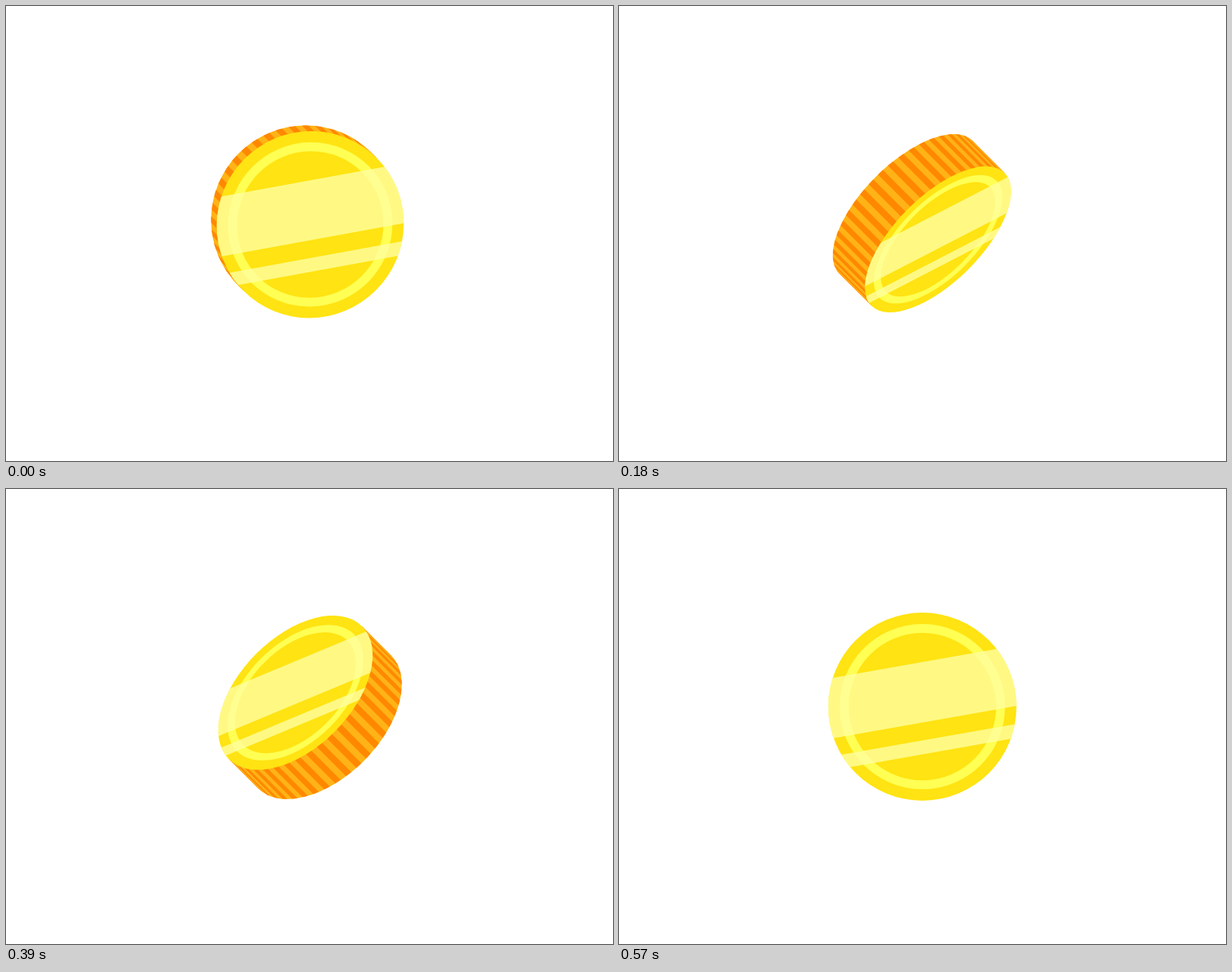
Recreate the animation shown at these times as an HTML page with a canvas. Size 800x600 px, loop 600 ms.

```html
<!DOCTYPE html>
<html lang="en">
<head>
<meta charset="utf-8">
<title>Spinning coin</title>
<style>
html, body { margin: 0; width: 100%; height: 100%; overflow: hidden; background: #fff; }
canvas { display: block; }
</style>
</head>
<body>
<canvas id="stage" width="800" height="600"></canvas>
<script>
const ctx = document.getElementById('stage').getContext('2d');
const TAU = Math.PI * 2;
const LOOP = 600, STEP = 30;
const CX = 399.8, CY = 287;
const RADIUS = 124, THICK = 67.3, DRIFT = 3.7;
const RIDGES = 44;
const SLOPE = Math.tan(Math.PI / 18);
const COLORS = {
  face: '#ffe312', ring: '#ffff54', shine: 'rgba(255,255,160,0.8)',
  rim: '#ffb316', ridge: '#ff8800'
};

function drawRim(side, back, front, squash) {
  ctx.save();
  ctx.beginPath();
  ctx.ellipse(0, back, RADIUS, RADIUS * squash, 0, Math.PI, side > 0 ? TAU : 0, side < 0);
  ctx.lineTo(RADIUS, front);
  ctx.lineTo(-RADIUS, front);
  ctx.closePath();
  ctx.fillStyle = COLORS.rim;
  ctx.fill();
  ctx.clip();
  ctx.fillStyle = COLORS.ridge;
  const pitch = TAU / RIDGES;
  for (let i = 0; i < RIDGES / 2; i++) {
    const right = RADIUS * Math.cos((i + 0.25) * pitch);
    const left = RADIUS * Math.cos((i + 0.75) * pitch);
    ctx.fillRect(left, -250, right - left, 500);
  }
  ctx.restore();
}

// Slanted strip between two heights measured on the vertical diameter
function strip(top, bottom) {
  const w = 140, rise = w * SLOPE;
  ctx.beginPath();
  ctx.moveTo(-w, top + rise);
  ctx.lineTo(w, top - rise);
  ctx.lineTo(w, bottom - rise);
  ctx.lineTo(-w, bottom + rise);
  ctx.fill();
}

function drawFace(y, squash) {
  ctx.save();
  ctx.translate(0, y);
  ctx.scale(1, squash);
  ctx.beginPath();
  ctx.arc(0, 0, RADIUS, 0, TAU);
  ctx.fillStyle = COLORS.face;
  ctx.fill();
  ctx.clip();
  ctx.beginPath();
  ctx.arc(0, 0, 103.1, 0, TAU);
  ctx.lineWidth = 11.8;
  ctx.strokeStyle = COLORS.ring;
  ctx.stroke();
  ctx.rotate(Math.PI / 4);
  ctx.fillStyle = COLORS.shine;
  strip(-58.8, 20.9);
  strip(44.6, 63);
  ctx.restore();
}

function draw(time) {
  const step = Math.floor((time % LOOP) / STEP);
  const deg = 9 * (step + 1);
  const turn = deg * Math.PI / 180;
  const cos = Math.cos(turn), sin = Math.sin(turn);
  const squash = Math.abs(cos);
  const side = deg <= 90 ? 1 : -1;
  const drift = -DRIFT * cos * squash * Math.min(1, (180 - deg) / 18);
  const half = side * THICK * sin / 2;

  ctx.setTransform(1, 0, 0, 1, 0, 0);
  ctx.fillStyle = '#fff';
  ctx.fillRect(0, 0, 800, 600);
  // Tilt the stage so the spin axis runs along x
  ctx.translate(CX, CY);
  ctx.rotate(-Math.PI / 4);
  if (sin > 0.01) drawRim(side, drift - half, drift + half, squash);
  if (squash > 0.01) drawFace(drift + half, squash);
}

const start = performance.now();
function tick() {
  draw(performance.now() - start);
  requestAnimationFrame(tick);
}
tick();
</script>
</body>
</html>
```
